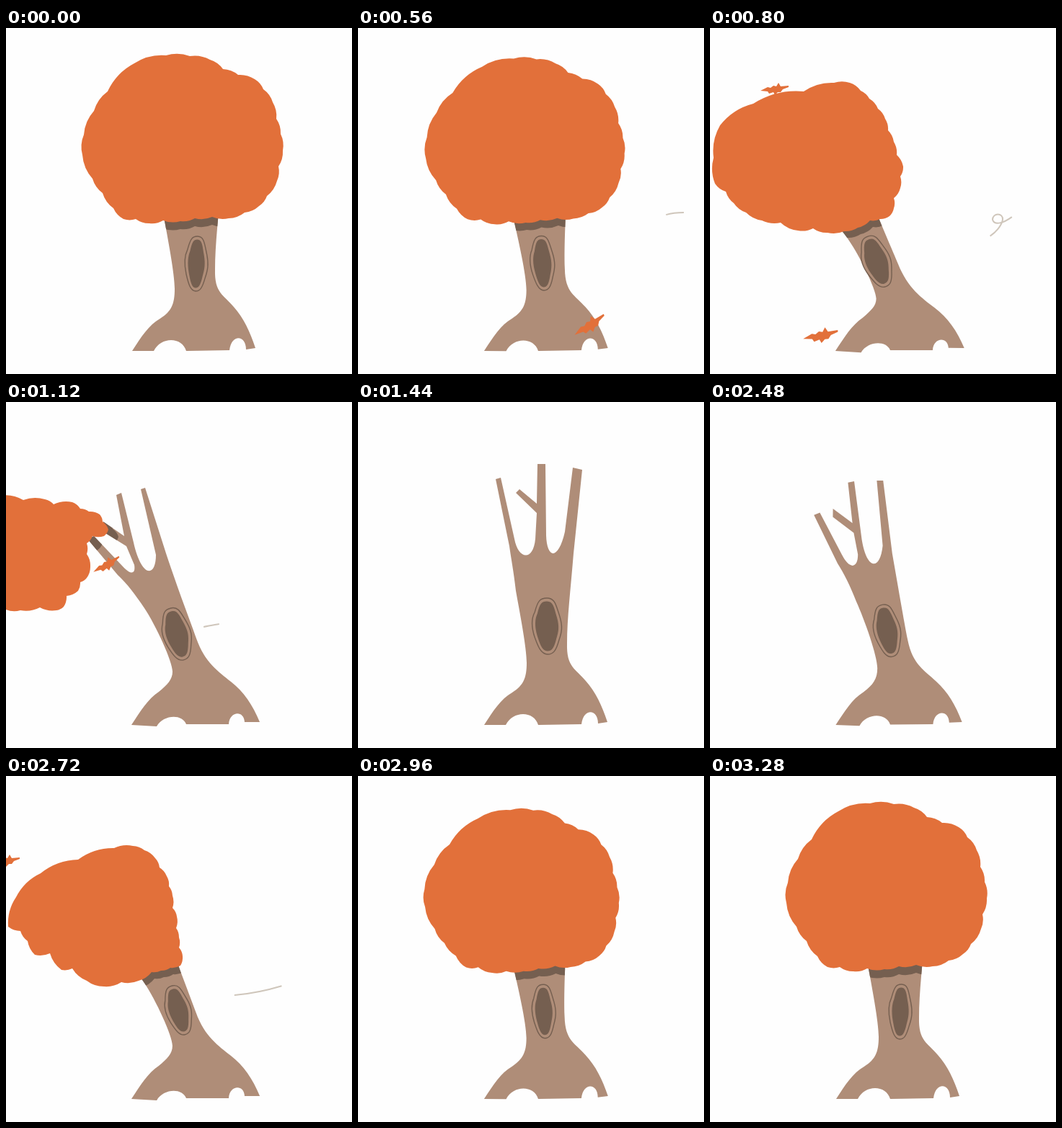
An HTML page for the animation above (3.68 s loop, 480 by 480 pixels).

```html
<!DOCTYPE html>
<html lang="en">
<head>
<meta charset="utf-8">
<title>Autumn wind</title>
<style>
html, body { margin: 0; width: 100%; height: 100%; overflow: hidden; background: #fefefe; }
svg { display: block; width: 100%; height: 100%; }
</style>
</head>
<body>
<svg viewBox="0 0 480 480">
  <defs>
    <clipPath id="bark"><path id="barkShape"/></clipPath>
    <path id="leaf" d="M-20 2 L-10 -3 L-6 -2 L-2 -5 L2 -4 L5 -9 L8 -4 L19 -5 L19 -3 L11 0 L8 4 L4 4 L0 8 L-2 4 L-8 6 L-10 3Z"/>
    <path id="knot" d="M0 -1 C.55 -1 .6 -.75 .85 -.35 C1.05 0 1 .2 .8 .5 C.6 .9 .4 1 .05 1 C-.4 1 -.6 .7 -.8 .4 C-1.05 0 -1 -.3 -.8 -.5 C-.6 -.9 -.45 -1 0 -1Z"/>
  </defs>
  <g id="winds" fill="none" stroke="#cfc6bb" stroke-width="2"></g>
  <path id="trunk" fill="#af8d78"/>
  <g clip-path="url(#bark)"><path id="shade" fill="#755f50"/></g>
  <use id="rim" href="#knot" fill="none" stroke="#755f50" stroke-width="1.4" style="vector-effect: non-scaling-stroke"/>
  <use id="hollow" href="#knot" fill="#755f50"/>
  <path id="crown" fill="#e2703a"/>
  <g id="leaves" fill="#e2703a"></g>
</svg>
<script>
const LOOP = 3680, STEP = 80;
const $ = id => document.getElementById(id);
const mix = (a, b, k) => a.map((v, i) => v + (b[i] - v) * k);

// Linear value between [time, values] keys
function track(keys, t) {
  let i = 1;
  while (i < keys.length - 1 && keys[i][0] < t) i++;
  const [t0, a] = keys[i - 1], [t1, b] = keys[i];
  return mix(a, b, Math.min(1, Math.max(0, (t - t0) / (t1 - t0))));
}

// Trunk outlines: standing and bent by the wind
const UPRIGHT = 'M175 448 C188 428 198 412 214 403 C230 393 234 382 234 362 C234 340 224 290 219 262 C216 235 212 215 210 200 L191 107 L198 105 L217 190 C222 218 243 222 246 190 L248 154 L219 126 L224 121 L248 141 L249 86 L260 86 L261 185 C262 218 278 220 287 180 L298 91 L311 94 L299 210 C295 260 290 300 290 335 C289 368 302 370 316 387 C330 403 338 420 346 444 L333 446 C333 426 313 424 310 447 L250 448 C244 428 215 428 205 448Z';
const BENT = 'M174 448 C187 428 197 412 212 402 C224 392 231 385 231 374 C231 360 208 310 192 286 C180 268 168 252 155 240 L113 190 L122 186 L160 226 C174 242 180 238 178 226 L167 200 L138 182 L135 166 L164 186 L153 129 L160 126 L177 195 C188 244 208 244 208 212 L187 121 L193 119 L222 210 C240 264 254 300 264 328 C276 362 295 374 312 388 C330 402 342 420 352 444 L331 444 C330 427 310 429 309 447 L250 447 C244 432 218 434 209 450Z';
const nums = s => s.match(/-?\d+/g).map(Number);
const bentNums = nums(BENT);

function trunkPath(lean) {
  let i = 0;
  return UPRIGHT.replace(/\d+/g, n => (+n + (bentNums[i++] - n) * lean).toFixed(1));
}

const leanKeys = [[0, 0], [400, 0], [480, -.05], [560, .12], [640, .45], [720, .82], [800, 1.12],
  [960, 1.1], [1120, 1], [1200, .75], [1280, .35], [1360, -.04], [1440, 0], [2320, 0], [2400, .2],
  [2480, .6], [2560, .95], [2640, 1.08], [2720, 1.02], [2800, .75], [2880, .42], [2960, .13],
  [3040, -.05], [3120, -.03], [3200, .01], [3280, 0]].map(([t, v]) => [t, [v]]);

// Crown outlines, clockwise from the top, one scallop between each pair of points
const round = nums('222 38 255 39 283 44 301 57 322 65 345 71 357 85 370 103 375 126 381 147 384 170 378 192 376 212 362 233 351 247 331 256 309 264 286 262 262 264 242 268 218 267 199 271 180 265 163 265 149 250 134 229 120 209 106 176 108 148 122 115 141 88 178 49');
const blown = nums('172 76 194 76 209 87 221 98 233 112 243 126 247 142 255 158 259 176 268 192 264 206 264 222 255 236 255 250 249 261 236 265 222 267 205 277 186 282 163 284 143 278 122 281 98 270 72 267 50 256 33 243 22 227 7 216 5 180 14 135 60 105 130 88');
const landing = nums('150 100 176 97 192 103 207 114 213 127 223 139 226 153 231 166 231 183 237 195 236 211 240 224 240 238 245 250 242 263 228 266 215 270 202 272 184 284 160 286 136 292 112 284 92 267 77 269 61 246 40 248 30 229 20 215 3 209 14 168 48 135 100 116');
const loose = nums('-10 130 24 136 54 135 66 142 92 139 103 148 115 152 130 156 134 166 142 177 136 186 120 186 112 196 112 211 117 228 112 244 103 250 100 262 84 269 80 284 70 289 47 285 20 289 0 288 -20 285 -45 280 -65 265 -80 245 -90 215 -85 185 -65 160 -40 140');
const shift = (p, dx) => p.map((v, i) => i % 2 ? v : v + dx);
const gone = shift(loose, -260);

const bend = k => mix(round, blown, k);
const rise = k => mix(landing, round, k);
const crownKeys = [[0, round], [400, round], [480, bend(-.06)], [560, bend(.12)], [640, bend(.45)],
  [720, bend(.8)], [800, blown], [960, mix(blown, loose, .4)], [1120, loose], [1280, gone],
  [2440, gone], [2560, shift(loose, -20)], [2720, landing], [2800, rise(.25)], [2880, rise(.55)],
  [2960, rise(.85)], [3040, rise(1.06)], [3120, rise(1.03)], [3200, rise(.99)], [3280, round]];

function scallops(p) {
  let d = `M${p[0]} ${p[1]}`;
  for (let i = 0; i < p.length; i += 2) {
    const j = (i + 2) % p.length;
    const dx = p[j] - p[i], dy = p[j + 1] - p[i + 1];
    const cx = p[i] + dx / 2 + dy * .17, cy = p[i + 1] + dy / 2 - dx * .17;
    d += `Q${cx.toFixed(1)} ${cy.toFixed(1)} ${p[j].toFixed(1)} ${p[j + 1].toFixed(1)}`;
  }
  return d + 'Z';
}

// Offset of the shadow the crown throws on the bark
const shadeKeys = [[400, [0, 11]], [800, [4, 9]], [1120, [14, 10]], [2500, [14, 10]],
  [2720, [4, 9]], [3040, [0, 11]]];

// Knot hole: centre, radii, tilt
const full = [264, 327, 16.5, 38, 3], bare = [262, 311, 21, 39, 0];
const knotKeys = [[0, full], [480, full], [800, [231, 324, 20, 37, -18]], [1120, [237, 322, 20, 37, -13]],
  [1360, bare], [2240, bare], [2320, [261, 308, 19, 38, 0]], [2560, [238, 322, 19, 36, -14]],
  [2720, [239, 325, 18, 35, -14]], [3040, full]];

// Leaves: time and place, speed per second, tilt, scale, half life
const leaves = [
  { t: 800, x: 90, y: 85, vx: -620, vy: 120, tilt: 0, size: 1, life: 160 },
  { t: 800, x: 154, y: 427, vx: -700, vy: 60, tilt: -4, size: 1.25, life: 240 },
  { t: 1120, x: 140, y: 226, vx: -650, vy: 40, tilt: -22, size: 1.05, life: 160 },
  { t: 2720, x: 0, y: 118, vx: -700, vy: 20, tilt: 0, size: 1, life: 160 }
];

// Wind strokes: path and [tail, head] along it
const winds = [
  { d: 'M452 256 C436 256 430 258 419 262 C408 270 395 275 392 266 C392 256 407 256 406 266 C404 276 394 286 386 290 C360 305 330 306 296 308 C288 309 280 311 274 312',
    keys: [[480, [0, 0]], [640, [0, 50]], [800, [34, 117]], [960, [120, 235]], [1120, [213, 235]], [1200, [240, 240]]] },
  { d: 'M455 272 C430 290 405 287 383 291 C360 298 340 302 317 304 C300 304 286 306 270 312',
    keys: [[2480, [0, 0]], [2600, [20, 80]], [2720, [76, 143]], [2880, [145, 192]], [2960, [195, 195]]] }
];

function add(parent, tag, attrs) {
  const el = document.createElementNS('http://www.w3.org/2000/svg', tag);
  for (const k in attrs) el.setAttribute(k, attrs[k]);
  return $(parent).appendChild(el);
}
leaves.forEach(l => l.el = add('leaves', 'use', { href: '#leaf' }));
winds.forEach(w => w.el = add('winds', 'path', { d: w.d }));

function draw(t) {
  const bark = trunkPath(track(leanKeys, t)[0]);
  $('trunk').setAttribute('d', bark);
  $('barkShape').setAttribute('d', bark);

  const crown = scallops(track(crownKeys, t));
  $('crown').setAttribute('d', crown);
  $('shade').setAttribute('d', crown);
  $('shade').setAttribute('transform', `translate(${track(shadeKeys, t)})`);

  const [x, y, rx, ry, tilt] = track(knotKeys, t);
  const place = inset => `translate(${x} ${y}) rotate(${tilt}) scale(${rx - inset} ${ry - inset})`;
  $('rim').setAttribute('transform', place(0));
  $('rim').setAttribute('stroke-width', 1.4);
  $('knot').setAttribute('vector-effect', 'non-scaling-stroke');
  $('hollow').setAttribute('transform', place(4.5));

  for (const l of leaves) {
    const s = (t - l.t) / 1000;
    l.el.setAttribute('visibility', Math.abs(t - l.t) <= l.life ? 'visible' : 'hidden');
    l.el.setAttribute('transform',
      `translate(${l.x + l.vx * s} ${l.y + l.vy * s}) rotate(${l.tilt + s * 90}) scale(${l.size})`);
  }

  for (const w of winds) {
    const [tail, head] = track(w.keys, t);
    w.el.setAttribute('visibility', head - tail > 1 ? 'visible' : 'hidden');
    w.el.setAttribute('stroke-dasharray', `0 ${tail} ${head - tail} 999`);
  }
}

function tick() {
  const t = performance.now() % LOOP;
  draw(Math.floor(t / STEP) * STEP);
  requestAnimationFrame(tick);
}
tick();
</script>
</body>
</html>
```
